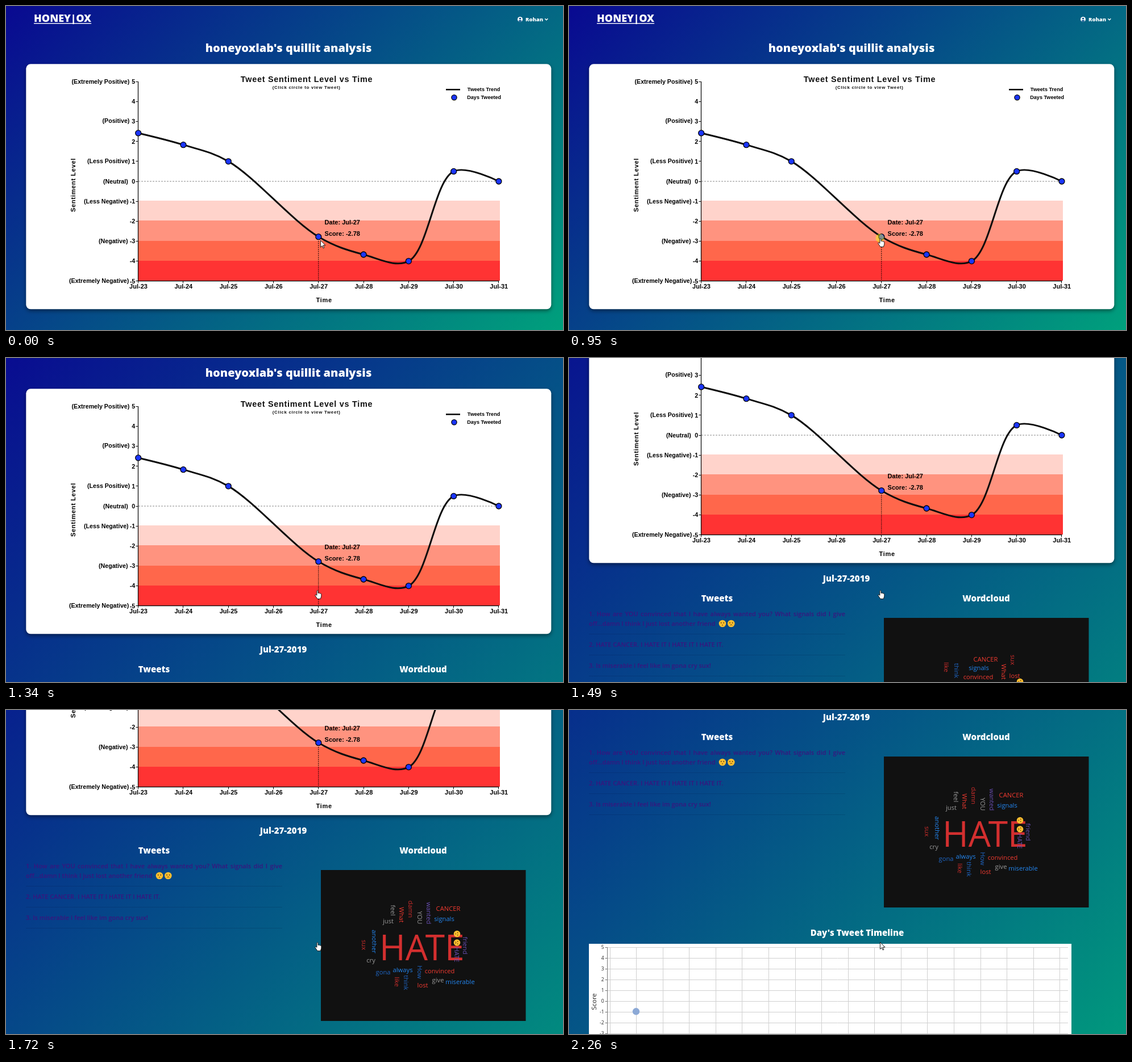
These frames come from a looping animation (980x571 px, 2.34 s). An HTML page with a canvas:

```html
<!DOCTYPE html>
<html lang="en">
<head>
<meta charset="utf-8">
<title>Sentiment dashboard</title>
<style>
html, body { margin: 0; width: 100%; height: 100%; overflow: hidden; background: #064088; }
canvas { display: block; }
</style>
</head>
<body>
<canvas id="stage" width="980" height="571"></canvas>
<script>
const W = 980, H = 571, LOOP = 2340;
const ctx = document.getElementById('stage').getContext('2d');
const SANS = '"Open Sans", sans-serif';
const ARIAL = '"Liberation Sans", Arial, sans-serif';
const RED = '#f03a30', DARK_RED = '#cf2e2c', BLUE = '#2386f0', DEEP_BLUE = '#1f66c4';
const GREY = '#999', PURPLE = '#6a50b5';

const STEPS = [0, 80, 400, 470, 950, 1100, 1190, 1250, 1330, 1410, 1490, 1570, 1650,
  1720, 1800, 1880, 1960, 2030, 2110, 2180, 2260];
const SCROLL_END = 549;
const SCROLL_KEYS = [[1100, 0], [1190, 0.027], [1490, 0.379], [1720, 0.5876], [1960, 0.821], [2180, 1]];

const clamp = v => Math.max(0, Math.min(1, v));
const ramp = (t, a, b) => clamp((t - a) / (b - a));
const swing = u => 0.5 - 0.5 * Math.cos(Math.PI * u);

function scrollAt(t) {
  let u = 0;
  for (let i = 1; i < SCROLL_KEYS.length; i++) {
    const [t0, u0] = SCROLL_KEYS[i - 1], [t1, u1] = SCROLL_KEYS[i];
    if (t >= t0) u = u0 + (u1 - u0) * ramp(t, t0, t1);
  }
  return Math.round(SCROLL_END * swing(u));
}

// Text is placed by the vertical middle of its capitals
function text(str, x, y, size, o = {}) {
  ctx.save();
  ctx.translate(x, y);
  if (o.turn) ctx.rotate(o.turn * Math.PI / 2);
  ctx.font = `${o.weight || 700} ${size}px ${o.font || ARIAL}`;
  ctx.letterSpacing = (o.gap || 0) + 'px';
  ctx.textAlign = o.align || 'left';
  ctx.fillStyle = o.color || '#000';
  ctx.fillText(str, 0, size * 0.358);
  const width = ctx.measureText(str).width;
  ctx.restore();
  return width;
}

const heading = (str, x, y, size = 15) =>
  text(str, x, y, size, { font: SANS, weight: 800, align: 'center', color: '#fff' });

function justified(str, x, y, width, size, o) {
  const words = str.split(' ');
  ctx.font = `${o.weight} ${size}px ${o.font}`;
  const sizes = words.map(w => ctx.measureText(w).width);
  const space = (width - sizes.reduce((a, b) => a + b)) / (words.length - 1);
  words.forEach((w, i) => { text(w, x, y, size, o); x += sizes[i] + space; });
}

function line(x0, y0, x1, y1, color, width = 1, dash = []) {
  ctx.beginPath();
  ctx.moveTo(x0, y0);
  ctx.lineTo(x1, y1);
  ctx.strokeStyle = color;
  ctx.lineWidth = width;
  ctx.setLineDash(dash);
  ctx.stroke();
  ctx.setLineDash([]);
}

function disc(x, y, r, fill, stroke, width = 1.3) {
  ctx.beginPath();
  ctx.arc(x, y, r, 0, 7);
  ctx.fillStyle = fill;
  ctx.fill();
  if (stroke) {
    ctx.strokeStyle = stroke;
    ctx.lineWidth = width;
    ctx.stroke();
  }
}

function rect(x, y, w, h, color) {
  ctx.fillStyle = color;
  ctx.fillRect(x, y, w, h);
}

function background(scroll, height) {
  const end = (W + height) / 2;
  const g = ctx.createLinearGradient(0, -scroll, end, end - scroll);
  g.addColorStop(0, '#090991');
  g.addColorStop(1, '#00a07c');
  rect(0, 0, W, H, g);
}

function header() {
  const w = text('HONEY|OX', 49, 22, 18, { font: SANS, weight: 800, color: '#fff' });
  rect(49, 30, w, 1.4, '#fff');
  disc(904.5, 23.5, 4.5, '#fff');
  disc(904.5, 22.2, 1.6, '#06508a');
  ctx.beginPath();
  ctx.ellipse(904.5, 26.3, 2.7, 1.5, 0, 0, 7);
  ctx.fill();
  text('Rohan', 914, 23.5, 9.5, { font: SANS, weight: 800, color: '#fff' });
  ctx.beginPath();
  ctx.moveTo(948.3, 22.3);
  ctx.lineTo(950.8, 24.8);
  ctx.lineTo(953.3, 22.3);
  ctx.strokeStyle = '#fff';
  ctx.lineWidth = 1.5;
  ctx.stroke();
  heading("honeyoxlab's quillit analysis", 497, 73.5, 20);
}

// Sentiment chart
const dayX = d => 232.7 + 79.28 * (d - 23);
const levelY = v => 309 - 35.15 * v;
const POINTS = [[23, 2.42], [24, 1.83], [25, 1], [27, -2.78], [28, -3.67], [29, -4], [30, 0.5], [31, 0]]
  .map(([d, v]) => [dayX(d), levelY(v)]);
const LEVELS = [['(Extremely Positive)', 5, 115.5], ['(Positive)', 3.04, 169.5], ['(Less Positive)', 1, 143],
  ['(Neutral)', 0, 171], ['(Less Negative)', -1, 137], ['(Negative)', -3, 163], ['(Extremely Negative)', -5, 111]];

// Centripetal Catmull-Rom curve
function curve(p) {
  const dist = (a, b) => Math.sqrt(Math.hypot(b[0] - a[0], b[1] - a[1]));
  const slope = i => {
    if (!i || i === p.length - 1) return [0, 0];
    const [a, b, c] = [p[i - 1], p[i], p[i + 1]], d = dist(a, b), e = dist(b, c);
    return [0, 1].map(k => (b[k] - a[k]) / d - (c[k] - a[k]) / (d + e) + (c[k] - b[k]) / e);
  };
  ctx.beginPath();
  ctx.moveTo(...p[0]);
  for (let i = 1; i < p.length; i++) {
    const a = p[i - 1], b = p[i], h = dist(a, b) / 3, m = slope(i - 1), n = slope(i);
    ctx.bezierCurveTo(a[0] + m[0] * h, a[1] + m[1] * h, b[0] - n[0] * h, b[1] - n[1] * h, ...b);
  }
  ctx.strokeStyle = '#0d0d0d';
  ctx.lineWidth = 3;
  ctx.stroke();
}

function sentimentCard(tip) {
  ctx.save();
  ctx.shadowColor = 'rgba(0,0,0,.45)';
  ctx.shadowBlur = 7;
  ctx.shadowOffsetY = 3;
  ctx.beginPath();
  ctx.roundRect(35.3, 102.3, 924, 432, 8);
  ctx.fillStyle = '#fff';
  ctx.fill();
  ctx.restore();

  const bands = ['#ffd3cb', '#ff937f', '#ff674b', '#ff3333'], edges = [343, 378, 414, 449, 484];
  bands.forEach((c, i) => rect(233, edges[i], 636, edges[i + 1] - edges[i], c));

  text('Tweet Sentiment Level vs Time', 529, 128.5, 14.4, { align: 'center', gap: 0.72, color: '#111' });
  text('(Click circle to view Tweet)', 528.7, 143, 7.9, { align: 'center', gap: 0.72, color: '#111' });
  text('Time', 559.7, 518, 11, { align: 'center', gap: 0.72 });
  text('Sentiment Level', 118, 315.5, 11, { align: 'center', gap: 0.72, turn: -1 });

  line(774, 147.3, 799, 147.3, '#0d0d0d', 2.6);
  disc(788.5, 161.3, 4.6, '#1a35ff', '#000');
  text('Tweets Trend', 811.8, 147, 9.1);
  text('Days Tweeted', 811.2, 161, 9.1);

  line(233, 309, 867, 309, '#888', 1, [3, 2]);
  line(232.5, 133, 232.5, 485, '#000', 1.2);
  line(232, 484.6, 867.5, 484.6, '#000', 1.2);
  for (let v = -5; v <= 5; v++) {
    const y = Math.floor(levelY(v)) + 0.5;
    line(228.5, y, 232.5, y, '#000');
    text(String(v), 227.2, levelY(v), 10.7, { align: 'right' });
  }
  LEVELS.forEach(([s, v, x]) => text(s, x, levelY(v) - 0.3, 10.65));
  for (let d = 23; d <= 31; d++) {
    const x = Math.floor(dayX(d)) + 0.5;
    line(x, 484.5, x, 488.5, '#000');
    text('Jul-' + d, dayX(d) + 0.3, 494, 11, { align: 'center' });
  }

  curve(POINTS);
  if (tip) {
    ctx.globalAlpha = tip;
    line(549.7, 407, 549.7, 484, '#000', 1.3, [1.5, 2]);
    text('Date: Jul-27', 560.6, 381, 11);
    text('Score: -2.78', 560.6, 401, 11);
    ctx.globalAlpha = 1;
  }
  POINTS.forEach(([x, y]) => disc(x, y, 5, '#1a35ff', '#000'));
}

function face(x, y, r, sad, turn = 0) {
  ctx.save();
  ctx.translate(x, y);
  ctx.rotate(turn * Math.PI / 2);
  disc(0, 0, r, '#fdbf2f');
  for (const s of [-1, 1]) disc(s * r * 0.36, -r * 0.2, r * 0.15, '#5b3a12');
  if (sad) {
    ctx.beginPath();
    ctx.arc(0, r * 0.68, r * 0.36, Math.PI * 1.15, Math.PI * 1.85);
    ctx.strokeStyle = '#5b3a12';
    ctx.lineWidth = 1;
    ctx.stroke();
  } else {
    disc(0, r * 0.42, r * 0.16, '#8a5a1c');
  }
  ctx.restore();
}

function tweets() {
  const o = { font: SANS, weight: 600, color: '#3a157e' };
  heading('Tweets', 260.5, 596.5);
  justified('1. How are YOU convinced that I have always wanted you? What signals did I give', 35, 624.3, 451, 11, o);
  text('off...damn I think I just lost another friend', 35, 641, 11, o);
  face(270, 641, 6.3, false);
  face(285.3, 641, 6.3, true);
  text('2. HATE CANCER. I HATE IT I HATE IT I HATE IT.', 35, 678, 11, o);
  text('3. Is miserable i feel like im gona cry sux!', 35, 715, 11, o);
  for (const y of [659.5, 696.5, 733.5]) line(35, y, 486, y, 'rgba(0,0,40,.14)');
}

// word, x, y, colour, upright?, and for some words an earlier place
const WORDS = [
  ['feel', 681, 702, GREY, 1], ['What', 696, 710, RED, 1, 765, 726], ['damn', 712, 700, DARK_RED, 1],
  ['YOU', 728, 715, GREY, 1], ['wanted', 744, 707, PURPLE, 1], ['CANCER', 778, 699, RED, 0, 733, 704],
  ['signals', 771, 717, BLUE, 0, 721, 719], ['just', 672.5, 721, GREY, 0], ['another', 648, 757, BLUE, 1],
  ['sux', 630, 763, DARK_RED, 1, 781, 705], ['cry', 642, 790, GREY, 0], ['gona', 663.5, 811, DEEP_BLUE, 0],
  ['always', 698, 806.5, BLUE, 0], ['How', 728, 811, DEEP_BLUE, 1], ['convinced', 763, 809, RED, 0, 720, 735],
  ['like', 688, 828, DARK_RED, 1, 664, 718], ['think', 704, 829.5, DEEP_BLUE, 1, 682, 724],
  ['lost', 733, 834, RED, 0, 784, 733], ['give', 760, 825, GREY, 0], ['miserable', 799, 828, BLUE, 0],
  ['friend', 808, 764, PURPLE, 1], ['HATE', 793, 780, PURPLE, 1]
];

function wordcloud(t) {
  heading('Wordcloud', 734, 596.5);
  rect(554, 631, 360.5, 266, '#111');
  const o = { font: SANS, weight: 400, align: 'center' };
  text('HATE', 731.8, 768.3, 62, { ...o, color: '#d32f2f' });
  const k = swing(ramp(t, 1490, 1720));
  for (const [word, x, y, color, turn, x0 = x, y0 = y < 760 ? 1528 - y : y] of WORDS)
    text(word, x0 + (x - x0) * k, y0 + (y - y0) * k, 11.2, { ...o, color, turn });
  face(793.5, 743.5, 5.8, false, 1);
  face(793.5, 759, 5.8, true, 1);
}

function timeline(t) {
  heading("Day's Tweet Timeline", 507, 942);
  rect(35, 961, 849, 240, '#fff');
  for (let i = 0; i < 18; i++) {
    const x = Math.floor(72 + 46.58 * i) + 0.5;
    line(x, 967, x, 1160, '#d0d0d0');
  }
  for (let i = 0; i <= 10; i++) {
    const y = Math.floor(967.3 + 19.05 * i) + 0.5;
    line(67, y, 878, y, '#d0d0d0');
    line(63.5, y, 68, y, '#777');
    text(String(5 - i), 61.5, y - 0.3, 8.5, { font: SANS, weight: 400, align: 'right', color: '#222' });
  }
  line(67.5, 967, 67.5, 1160, '#777');
  text('Score', 44, 1063, 11.5, { font: SANS, weight: 400, align: 'center', turn: -1, color: '#222' });
  ctx.globalAlpha = ramp(t, 1880, 2110);
  disc(118, 1080.3, 6.2, '#8ca9d6');
  ctx.globalAlpha = 1;
}

// Pointers
const ARROW = new Path2D('M0 0V17L4 13.3L6.6 19.2L9 18.2L6.4 12.3H12Z');
const HAND = new Path2D('M5 2Q6.5 -0.5 8 2V7.5Q9.5 6 11 7.8Q12.5 6.8 13.6 8.6Q15.6 8 16 10.5V15L14 21.5H6.5L1 13.5Q0.5 10.5 3 11.5L5 13Z');

function pointer(path, x, y) {
  ctx.save();
  ctx.translate(x, y);
  ctx.scale(0.72, 0.72);
  ctx.fillStyle = '#fff';
  ctx.fill(path);
  ctx.strokeStyle = '#111';
  ctx.lineWidth = 1.3;
  ctx.lineJoin = 'round';
  ctx.stroke(path);
  ctx.restore();
}

function draw(t) {
  const opened = t >= 1100, scroll = scrollAt(t);
  background(scroll, opened ? 1240 : H);
  ctx.save();
  ctx.translate(0, -scroll);
  header();
  sentimentCard(t < 80 || t >= 470 ? 1 : t >= 400 ? 0.5 : 0);
  if (opened) {
    heading('Jul-27-2019', 488, 562);
    tweets();
    wordcloud(t);
    timeline(t);
  }
  ctx.restore();
  if (t >= 950 && t < 1100) disc(547, 409, 7.5, 'rgba(255,255,0,.45)');
  if (t < 400) pointer(ARROW, 553.4, 413);
  else if (t < 2260) pointer(HAND, 543.3, 409);
  else pointer(ARROW, 547.4, 409.2);
}

const start = performance.now();
let shown = -1;
function tick() {
  const now = (performance.now() - start) % LOOP;
  const step = STEPS.filter(s => s <= now).pop() || 0;
  if (step !== shown) draw(shown = step);
  requestAnimationFrame(tick);
}
tick();
</script>
</body>
</html>
```
